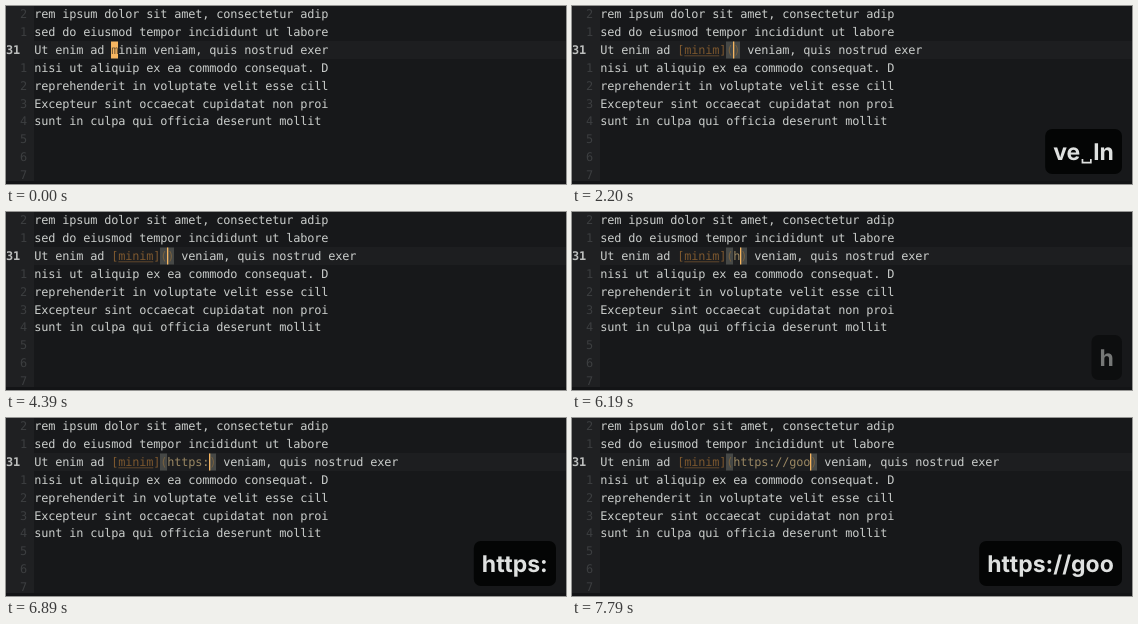
Write an HTML page with a canvas that moves like this. It is 560x178 px and loops after 8000 ms.

```html
<!DOCTYPE html>
<html lang="en">
<head>
<meta charset="utf-8">
<title>Editor with key display</title>
<style>
  html, body { margin: 0; width: 100%; height: 100%; overflow: hidden; background: #17181a; }
  canvas { display: block; width: 560px; height: 178px; }
</style>
</head>
<body>
<canvas id="stage"></canvas>
<script>
const W = 560, H = 178, LOOP = 8000;
const CELL = 7, ROW = 17.9, LEFT = 28.3, BASE = 12;
const CODE_FONT = '11.9px "DejaVu Sans Mono", "Liberation Mono", monospace';
const KEY_FONT = '700 23px Inter, "Open Sans", sans-serif';
const C = {
  bg: '#17181a', gutter: '#1f2022', line: '#1d1e20', foot: '#131416',
  text: '#cacdcb', number: '#3c3e40', current: '#bcbebd',
  visual: '#37393b', cursor: '#f6b560', match: '#464846',
  label: '#7c572e', url: '#9a8762', paren: '#77603e',
  keyBox: '#040505', key: '#dfe1e0'
};
const LINES = [
  'rem ipsum dolor sit amet, consectetur adip',
  'sed do eiusmod tempor incididunt ut labore',
  '',
  'nisi ut aliquip ex ea commodo consequat. D',
  'reprehenderit in voluptate velit esse cill',
  'Excepteur sint occaecat cupidatat non proi',
  'sunt in culpa qui officia deserunt mollit'
];
const HEAD = 'Ut enim ad ', WORD = 'minim', TAIL = ' veniam, quis nostrud exer';
const ACTIVE = 2;

// [time, keys shown, opacity]
const KEYS = [
  [0, '', 0], [500, 'v', 0.5], [600, 've', 1], [1900, 've␣', 1],
  [2100, 've␣l', 1], [2200, 've␣ln', 1],
  [4190, 've␣ln', 0.7], [4290, 've␣ln', 0.3], [4390, '', 0],
  [6190, 'h', 0.5], [6290, 'h', 1], [6390, 'ht', 1], [6490, 'htt', 1],
  [6590, 'http', 1], [6690, 'https', 1], [6890, 'https:', 1],
  [7190, 'https:/', 1], [7290, 'https://', 1],
  [7490, 'https://g', 1], [7590, 'https://go', 1], [7790, 'https://goo', 1]
];
// [time, characters of the address typed]
const TYPED = [
  [2200, 0], [6190, 1], [6390, 2], [6490, 3], [6590, 4], [6690, 5], [6790, 6],
  [7190, 7], [7290, 8], [7490, 9], [7590, 10], [7690, 11]
];
const ADDRESS = 'https://goo';

const canvas = document.getElementById('stage');
const ctx = canvas.getContext('2d');
const ratio = window.devicePixelRatio || 1;
canvas.width = W * ratio;
canvas.height = H * ratio;
ctx.scale(ratio, ratio);
ctx.textRendering = 'geometricPrecision';

const at = (list, t) => list.filter(step => step[0] <= t).pop();
const colX = col => LEFT + col * CELL;

function rect(color, x, y, w, h) {
  ctx.fillStyle = color;
  ctx.fillRect(x, y, w, h);
}

function put(text, x, row, color) {
  ctx.fillStyle = color;
  [...text].forEach((ch, i) => {
    if (ch !== ' ') ctx.fillText(ch, x + i * CELL, BASE + row * ROW);
  });
}

function cells(color, col, count) {
  rect(color, Math.round(colX(col)), 35.5, count * CELL, 17);
}

function drawPage() {
  rect(C.bg, 0, 0, W, H);
  rect(C.gutter, 0, 0, 28, 175);
  rect(C.line, 28, 35, W, 18);
  rect(C.foot, 0, 175, W, 3);
  for (let row = 0; row < 10; row++) {
    if (row !== ACTIVE) put(String(Math.abs(row - ACTIVE)), 2 * CELL, row, C.number);
    put(LINES[row] || '', LEFT, row, C.text);
  }
  ctx.font = 'bold ' + CODE_FONT;
  put('31', 0, ACTIVE, C.current);
  ctx.font = CODE_FONT;
}

function drawPlainLine(t) {
  const start = HEAD.length;
  const cur = t < 600 ? start : start + WORD.length - 1;
  cells(C.visual, start, cur - start);
  put(HEAD + WORD + TAIL, LEFT, ACTIVE, C.text);
  cells(C.cursor, cur, 1);
  put('m', colX(cur), ACTIVE, '#6b512f');
}

function drawLinkLine(count) {
  const label = HEAD.length, open = label + WORD.length + 2;
  const close = open + 1 + count;
  cells(C.match, open, 1);
  cells(C.match, close, 1);
  put(HEAD, LEFT, ACTIVE, C.text);
  put('[' + WORD + ']', colX(label), ACTIVE, C.label);
  rect(C.label, colX(label + 1), 49.5, WORD.length * CELL, 0.7);
  put('(', colX(open), ACTIVE, C.paren);
  put(ADDRESS.slice(0, count), colX(open + 1), ACTIVE, C.url);
  put(')', colX(close), ACTIVE, C.paren);
  put(TAIL, colX(close + 1), ACTIVE, C.text);
  rect(C.cursor, Math.round(colX(close)), 35.5, 1.3, 17);
}

function drawKeys(keys, alpha) {
  if (!alpha) return;
  const [before, after] = keys.split('␣');
  const gap = after === undefined ? 0 : 13;
  const w1 = ctx.measureText(before).width;
  const width = w1 + gap + ctx.measureText(after || '').width;
  const x = 541.8 - width, y = 154.3;
  ctx.globalAlpha = alpha;
  ctx.fillStyle = C.keyBox;
  ctx.beginPath();
  ctx.roundRect(x - 8, 123, width + 16.2, 45, 7);
  ctx.fill();
  ctx.fillStyle = ctx.strokeStyle = C.key;
  ctx.fillText(before, x, y);
  if (gap) {
    const left = x + w1 + 2.2;
    ctx.lineWidth = 1.7;
    ctx.beginPath();
    ctx.moveTo(left, 153);
    ctx.lineTo(left, 156.6);
    ctx.lineTo(left + 8.4, 156.6);
    ctx.lineTo(left + 8.4, 153);
    ctx.stroke();
    ctx.fillText(after, x + w1 + gap, y);
  }
  ctx.globalAlpha = 1;
}

function frame() {
  const t = performance.now() % LOOP;
  ctx.font = CODE_FONT;
  drawPage();
  const typed = at(TYPED, t);
  if (typed) drawLinkLine(typed[1]);
  else drawPlainLine(t);
  ctx.font = KEY_FONT;
  const [, keys, alpha] = at(KEYS, t);
  drawKeys(keys, alpha);
  requestAnimationFrame(frame);
}
frame();
</script>
</body>
</html>
```
